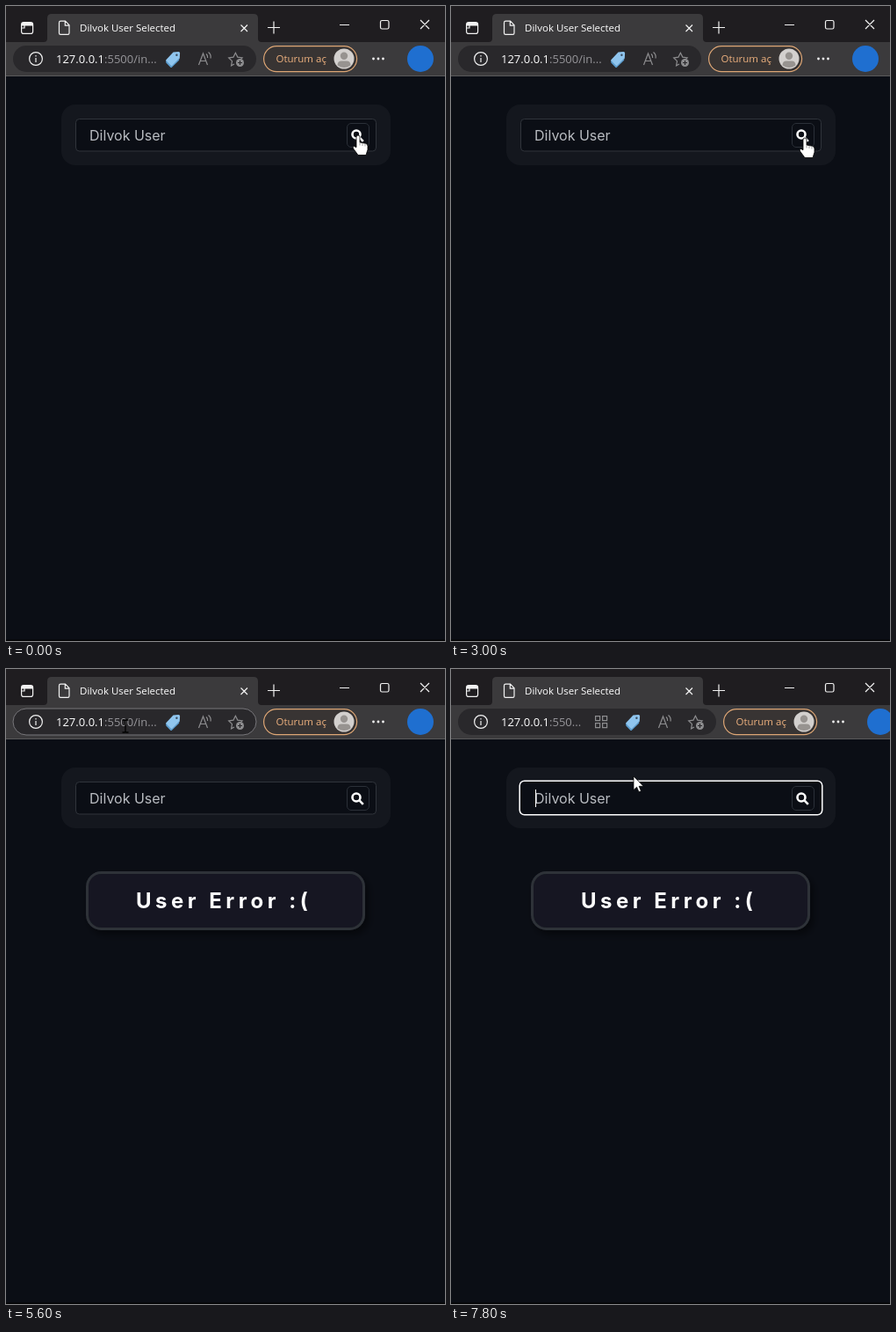
An HTML page for the animation above (8000 ms loop, 500 px wide and 722 px high).

```html
<!DOCTYPE html>
<html lang="en">
<head>
<meta charset="utf-8">
<title>User search</title>
<style>
  html, body { margin: 0; width: 100%; height: 100%; overflow: hidden; background: #0b0e15; }
  svg { display: block; width: 500px; height: 722px; }
  text { white-space: pre; }
  .ui { font-family: "Open Sans", "Noto Sans", sans-serif; }
  .page { font-family: Inter, Lato, sans-serif; }
  .line { fill: none; stroke: #f2f2f2; stroke-width: 1.2; }
  .dim { fill: none; stroke: #8d8d8f; stroke-width: 1.2; }
</style>
</head>
<body>
<svg viewBox="0 0 500 722">
  <defs>
    <filter id="shadow" x="-10%" y="-20%" width="120%" height="150%">
      <feDropShadow dx="4" dy="5" stdDeviation="4" flood-color="#000" flood-opacity=".45"/>
    </filter>
    <clipPath id="urlClip"><rect x="57" y="49" width="97" height="22"/></clipPath>
  </defs>

  <rect width="500" height="722" fill="#0b0e15"/>
  <rect y="720.5" width="500" height="1.5" fill="#040405"/>

  <!-- Title bar -->
  <rect width="500" height="41" fill="#1f1d20"/>
  <path d="M43 41q4 0 4-4V14q0-5 5-5h230q5 0 5 5v23q0 4 4 4z" fill="#3b3a3c"/>
  <rect class="line" x="17.6" y="18.6" width="13" height="12.8" rx="2.5"/>
  <path d="M18 19h12.5v3.5H18z" fill="#f2f2f2"/>
  <path class="line" d="M21 22v3h-3"/>
  <path class="line" d="M60.5 19q0-1.8 1.8-1.8h5.2l4.5 4.5v9q0 1.6-1.6 1.6h-8.3q-1.6 0-1.6-1.6zM67.3 17.5v4.7h4.5"/>
  <text class="ui" x="84" y="29" font-size="11.5" fill="#fff">Dilvok User Selected</text>
  <path class="line" d="M267.5 21.5l7.5 7.5m0-7.5l-7.5 7.5M298 24.5h14M305 17.5v14M380 21.5h11M472 16l10 10m0-10l-10 10"/>
  <rect class="line" x="426.5" y="16.5" width="9.5" height="9.5" rx="1.8"/>

  <!-- Toolbar -->
  <rect y="41" width="500" height="39" fill="#3b3a3c"/>
  <rect y="79" width="500" height="1" fill="#59595b"/>
  <rect id="pill" x="8" y="45" height="30" rx="15" fill="#29282b"/>
  <circle class="line" cx="34" cy="60" r="7.4"/>
  <path class="line" d="M34 59v5M34 56v1.4"/>
  <text class="ui" x="57" y="65" font-size="13" fill="#fff" id="url">127.0.0.1<tspan fill="#97969a" id="urlTail"></tspan></text>
  <g id="selection" clip-path="url(#urlClip)">
    <rect x="57" y="49" width="97" height="22" fill="#8fbcec"/>
    <text class="ui" x="57" y="65" font-size="13" fill="#10151c">127.0.0.1:5500/i</text>
  </g>
  <g id="gridIcon" class="dim">
    <path d="M164.6 53.6h5v5h-5zM172.6 53.6h5v5h-5zM164.6 61.6h5v5h-5zM172.6 61.6h5v5h-5z"/>
  </g>
  <g id="tools">
    <path d="M190.5 52.5l6-.5q1.6 0 1.6 1.6l-.3 6-8.3 8.5q-1 1-2 0l-5-5q-1-1 0-2z" fill="#8fc5ee"/>
    <path d="M182.3 62l6.2 6.6 8.8-8.8-.2 2-8 7.8q-1 1-2 0l-4.8-5z" fill="#5b9fd2"/>
    <circle cx="194.4" cy="55.7" r="1.2" fill="#3a4d60"/>
    <path class="dim" d="M219.5 67l5-13 5 13M221.3 62.5h6.4M228 54.5q2 1.5 1.6 4.5M230.5 52.5q3.3 2.5 2.6 7"/>
    <path class="dim" d="M260 66l-3.4 1.8.9-5.2-3.8-3.7 5.3-.8 2.4-4.8 2.4 4.8 5.3.8-1.4 1.4"/>
    <circle cx="266.5" cy="64.5" r="4.5" fill="#8d8d8f"/>
    <path d="M264 64.5h5M266.5 62v5" stroke="#29282b" stroke-width="1.2"/>
    <rect x="293.6" y="45.6" width="106" height="29" rx="14.5" fill="#383433" stroke="#dda675" stroke-width="1.2"/>
    <text class="ui" x="307.5" y="64" font-size="11.5" fill="#efb27f">Oturum aç</text>
    <circle cx="385" cy="60" r="11.5" fill="#d3d0ce"/>
    <circle cx="385" cy="56.8" r="4.2" fill="#979390"/>
    <path d="M377.5 67.5q0-5 4.5-5h6q4.500 0 4.500 5-7.500 5-15 0z" fill="#979390"/>
    <g fill="#f2f2f2">
      <circle cx="418.500" cy="60" r="1.400"/><circle cx="424" cy="60" r="1.400"/><circle cx="429.500" cy="60" r="1.400"/>
    </g>
    <circle cx="472" cy="60" r="15" fill="#1f6fd0"/>
  </g>

  <!-- Search form -->
  <rect x="63" y="112" width="375" height="69" rx="16" fill="#14171e"/>
  <rect id="field" fill="#0b0e15"/>
  <text class="page" x="95" y="152.500" font-size="16" fill="#b9bcc1">Dilvok User</text>
  <path id="caret" d="M96.500 137v20" stroke="#fff"/>
  <rect x="388.500" y="133.500" width="25" height="27" rx="4.500" fill="#0b0e15" stroke="#2b3038"/>
  <g fill="none" stroke="#fff" stroke-width="2.600">
    <circle cx="399" cy="146" r="4.500"/><path d="M402.200 149.200l4.600 4.600"/>
  </g>

  <g id="error">
    <rect x="92.500" y="231.500" width="315" height="64" rx="16" fill="#151820" stroke="#2e3138" stroke-width="3" filter="url(#shadow)"/>
    <text class="page" x="148" y="272" font-size="24" font-weight="700" letter-spacing="4.500" fill="#fff">User Error :(</text>
  </g>

  <!-- Pointer shapes, each with its hot spot at 0,0 -->
  <g id="pointer">
    <path id="arrow" d="M0 0v15.500l3.600-3.300 2.400 5.600 2.500-1-2.400-5.500h5z" fill="#fff" stroke="#000" stroke-width=".7"/>
    <path id="beam" d="M-3.500-7h2.700L0-6.200.8-7h2.700M0-6.200V6.200M-3.500 7h2.700L0 6.200.8 7h2.700" fill="none" stroke="#000" stroke-width="1.300"/>
    <g id="hand">
      <path d="M-2 2a2 2 0 0 1 4 0v6l6.500 1.300q2.500.6 2.500 3v4l-2 6.200H0l-5.500-7.500q-1-2.200 1-2.500L-2 13.700z" fill="#fff" stroke="#000" stroke-width=".8"/>
      <path d="M2 8v3.500M5 9v3M8 9.500v3" stroke="#777" stroke-width=".7"/>
    </g>
  </g>
</svg>
<script>
const LOOP = 8000, STEP = 200;
const $ = id => document.getElementById(id);
const show = (id, on) => $(id).style.display = on ? '' : 'none';
const set = (id, attrs) => Object.entries(attrs).forEach(([k, v]) => $(id).setAttribute(k, v));

// Pointer hot spot: time, x, y
const path = [
  [0, 401, 147], [200, 400, 147], [800, 358, 152], [1200, 356, 154], [1600, 357, 153],
  [2200, 400, 145], [3000, 403, 150], [3300, 403, 150], [3800, 267, 234], [4600, 264, 246],
  [5600, 136, 65], [5800, 136, 65], [6400, 206, 150], [7000, 206, 150], [7800, 208, 122]
];

function pointerAt(t) {
  const next = path.findIndex(p => p[0] > t);
  if (next < 0) return path.at(-1).slice(1);
  const [t0, x0, y0] = path[next - 1], [t1, x1, y1] = path[next];
  const u = (t - t0) / (t1 - t0), k = u * u * (3 - 2 * u);
  return [x0 + (x1 - x0) * k, y0 + (y1 - y0) * k];
}

function focusAt(t) {
  if (t >= 6800) return { on: 'field', since: 6800 };
  if (t >= 5800) return { on: 'url' };
  if (t >= 800 && t < 2800) return { on: 'field', since: 800 };
  return {};
}

const inside = ([x, y], l, t, r, b) => x >= l && x <= r && y >= t && y <= b;

function draw(t) {
  const shifted = t >= 5800, focus = focusAt(t), spot = pointerAt(t);
  const urlFocus = focus.on === 'url', fieldFocus = focus.on === 'field';
  const pillEnd = shifted ? 302 : 285;
  const overPill = inside(spot, 8, 45, pillEnd, 75);
  const overButton = inside(spot, 388, 133, 414, 161);
  const overField = inside(spot, 79, 128, 422, 166);

  set('pill', {
    width: pillEnd - 8,
    stroke: urlFocus ? '#6fb1e6' : overPill ? '#77767a' : 'none',
    'stroke-width': urlFocus ? 2 : 1
  });
  set('tools', { transform: `translate(${shifted ? 17 : 0})` });
  show('gridIcon', shifted);
  show('selection', urlFocus);
  show('url', !urlFocus);
  $('urlTail').textContent = shifted ? ':550...' : ':5500/in...';

  set('field', fieldFocus
    ? { x: 78.2, y: 127.2, width: 344.6, height: 38.6, rx: 5.5, stroke: '#fff', 'stroke-width': 1.5 }
    : { x: 79.5, y: 128.5, width: 342, height: 36.5, rx: 4, stroke: '#30343b', 'stroke-width': 1 });
  show('caret', fieldFocus && (t - focus.since) % 1000 < 500);
  show('error', t >= 3400);

  const shape = overButton ? 'hand' : overField || overPill ? 'beam' : 'arrow';
  ['hand', 'beam', 'arrow'].forEach(id => show(id, id === shape));
  set('pointer', { transform: `translate(${spot})` });
}

function tick() {
  draw(Math.floor(performance.now() % LOOP / STEP) * STEP);
  requestAnimationFrame(tick);
}
tick();
</script>
</body>
</html>
```
